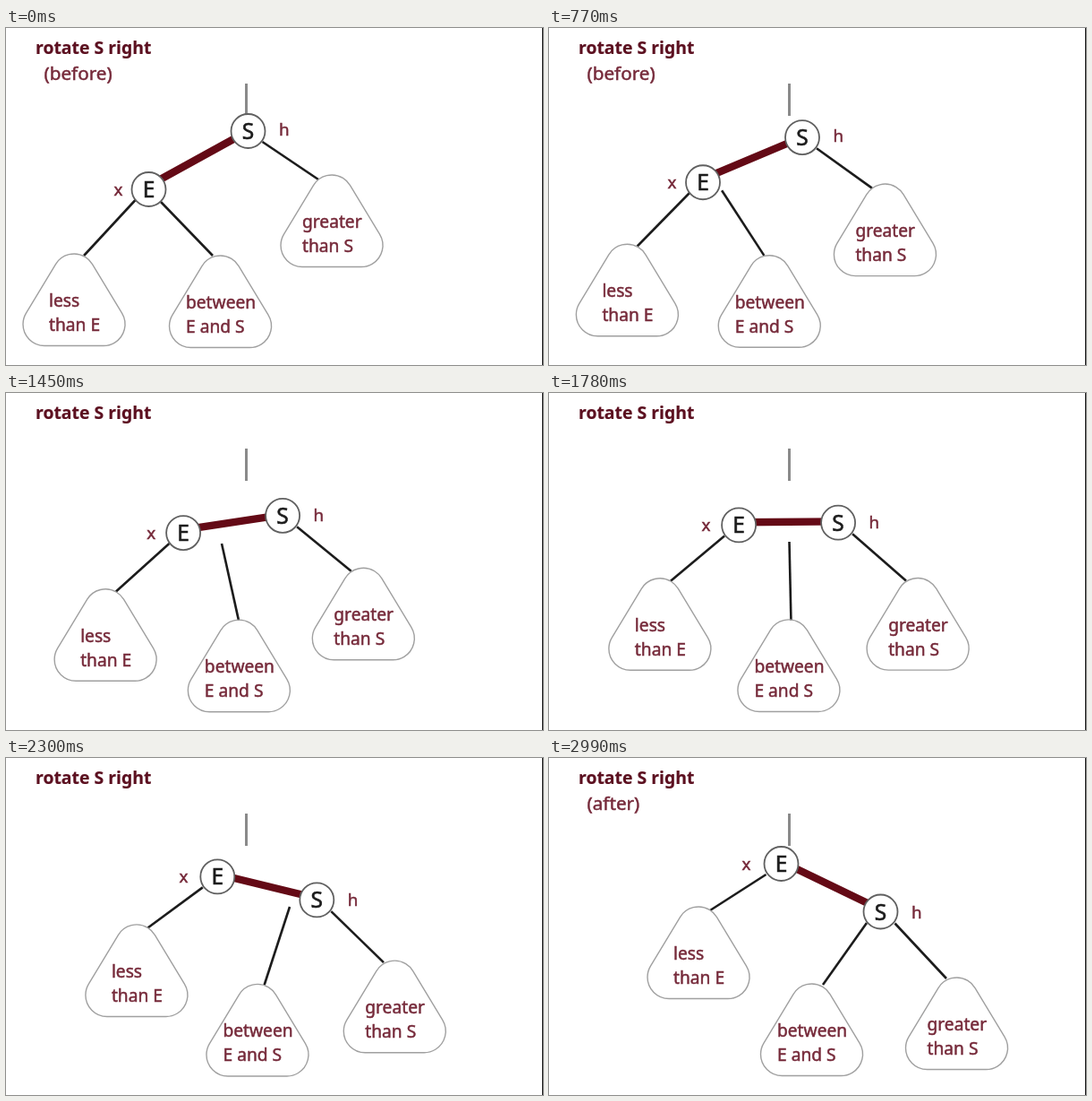
These frames come from a looping animation (600x376 px, 3030 ms). An HTML page with a canvas:

```html
<!DOCTYPE html>
<html lang="en">
<head>
<meta charset="utf-8">
<title>Rotate right</title>
<style>
html, body { margin: 0; width: 100%; height: 100%; overflow: hidden; background: #fff; }
canvas { display: block; }
</style>
</head>
<body>
<canvas id="stage" width="600" height="376"></canvas>
<script>
const ctx = document.getElementById('stage').getContext('2d');
const LOOP = 3030, HOLD = 280;
const FAMILY = '"Noto Sans", "Open Sans", sans-serif';
const MAROON = '#762a3a', DARK = '#5c1020', INK = '#1c1c1c';

// [step, value] keys
const PROGRESS = [[0, 0], [5, .035], [13, .125], [21, .238], [30, .386], [38, .526], [51, .768], [60, .91], [68, 1]];
const SWING_X = [[0, 173], [5, 177], [21, 212], [30, 241], [38, 268.5], [51, 317], [68, 355]];
const SWING_Y = [[0, 194], [5, 189], [21, 174], [30, 168], [38, 166], [51, 166], [68, 184]];

const mix = (a, b, p) => a + (b - a) * p;
const mixPoint = (a, b, p) => [mix(a[0], b[0], p), mix(a[1], b[1], p)];
const shift = ([x, y], dx, dy) => [x + dx, y + dy];
const ramp = (a, b, v) => Math.min(1, Math.max(0, (v - a) / (b - a)));

// Smooth curve through the keys
function track(keys, n) {
  let i = 0;
  while (i < keys.length - 2 && n >= keys[i + 1][0]) i++;
  const slope = k => {
    const a = keys[Math.max(0, k - 1)], b = keys[Math.min(keys.length - 1, k + 1)];
    return (b[1] - a[1]) / (b[0] - a[0]);
  };
  const [n0, v0] = keys[i], [n1, v1] = keys[i + 1];
  const d = n1 - n0, u = (n - n0) / d, w = 1 - u;
  return v0 * (1 + 2 * u) * w * w + slope(i) * d * u * w * w
       + v1 * u * u * (3 - 2 * u) - slope(i + 1) * d * u * u * w;
}

// 27 steps every 1090 ms; one of them lasts 10 ms longer
function stepAt(t) {
  if (t < HOLD) return 0;
  const u = t - HOLD, v = u % 1090;
  return Math.min(68, 1 + 27 * Math.floor(u / 1090) + Math.floor((v - (v > 250 ? 10 : 0)) / 40));
}

function line(a, b, color = INK, width = 2.6) {
  ctx.strokeStyle = color;
  ctx.lineWidth = width;
  ctx.beginPath();
  ctx.moveTo(...a);
  ctx.lineTo(...b);
  ctx.stroke();
}

function text(str, x, y, size, color, weight = 400, align = 'left', edge = .5) {
  ctx.font = `${weight} ${size}px ${FAMILY}`;
  ctx.textAlign = align;
  ctx.fillStyle = ctx.strokeStyle = color;
  ctx.lineWidth = edge;
  ctx.fillText(str, x, y);
  ctx.strokeText(str, x, y);
}

function node(letter, [x, y]) {
  ctx.beginPath();
  ctx.arc(x, y, 19, 0, 2 * Math.PI);
  ctx.fillStyle = '#fff';
  ctx.fill();
  ctx.strokeStyle = '#606060';
  ctx.lineWidth = 1.8;
  ctx.stroke();
  text(letter, x, y + 9, 24.5, INK, 400, 'center', .6);
}

function subtree([x, y], top, bottom, indent) {
  const r = 24, a = Math.atan2(-33, 54.5);
  ctx.beginPath();
  ctx.arc(x, y + r, r, -Math.PI - a, a);
  ctx.arc(x + 33, y + 78.5, r, a, Math.PI / 2);
  ctx.arc(x - 33, y + 78.5, r, Math.PI / 2, Math.PI - a);
  ctx.closePath();
  ctx.strokeStyle = '#a0a0a0';
  ctx.lineWidth = 1.4;
  ctx.stroke();
  text(top, x - indent, y + 59, 19.2, MAROON);
  text(bottom, x - indent, y + 86, 19.2, MAROON);
}

function caption(str, alpha) {
  ctx.globalAlpha = alpha;
  text(str, 42.5, 58, 20.7, MAROON);
  ctx.globalAlpha = 1;
}

function draw(n) {
  const p = track(PROGRESS, n);
  const e = mixPoint([159.5, 180], [259.5, 118], p);
  const s = mixPoint([270.5, 115], [370.5, 171.5], p);
  const left = mixPoint([76, 252], [167, 166], p);
  const mid = mixPoint([239.5, 254], [293.5, 252], p);
  const right = mixPoint([364, 164], [455.5, 245], p);

  ctx.fillStyle = '#fff';
  ctx.fillRect(0, 0, 600, 376);
  ctx.fillStyle = '#111';
  ctx.fillRect(599, 0, 1, 376);

  text('rotate S right', 33, 28.7, 19.4, DARK, 700, 'left', .2);
  caption('(before)', 1 - ramp(13, 26, n));
  caption('(after)', ramp(55, 67, n));

  line([268.5, 62], [268.5, 98], '#8a8a8a', 3);
  line(shift(e, mix(-15, -17, p), 12), mixPoint([87, 254], [180, 170], p));
  line(shift(s, 16, mix(12, 13, p)), mixPoint([349, 169], [444, 246], p));
  line([track(SWING_X, n), track(SWING_Y, n)], mixPoint([231, 254], [306, 253], p));
  line(shift(e, 0, mix(-4, -2.5, p)), shift(s, 0, mix(0, -2.5, p)), '#640a16', 8.4);

  subtree(left, 'less', 'than E', 28);
  subtree(mid, 'between', 'E and S', 38.5);
  subtree(right, 'greater', 'than S', 33);

  node('E', e);
  node('S', s);
  text('x', e[0] + mix(-39, -44, p), e[1] + 7, 18.8, MAROON);
  text('h', s[0] + 34.5, s[1] + mix(5, 7, p), 18.8, MAROON);
}

const start = performance.now();
function frame() {
  draw(stepAt((performance.now() - start) % LOOP));
  requestAnimationFrame(frame);
}
frame();
</script>
</body>
</html>
```
